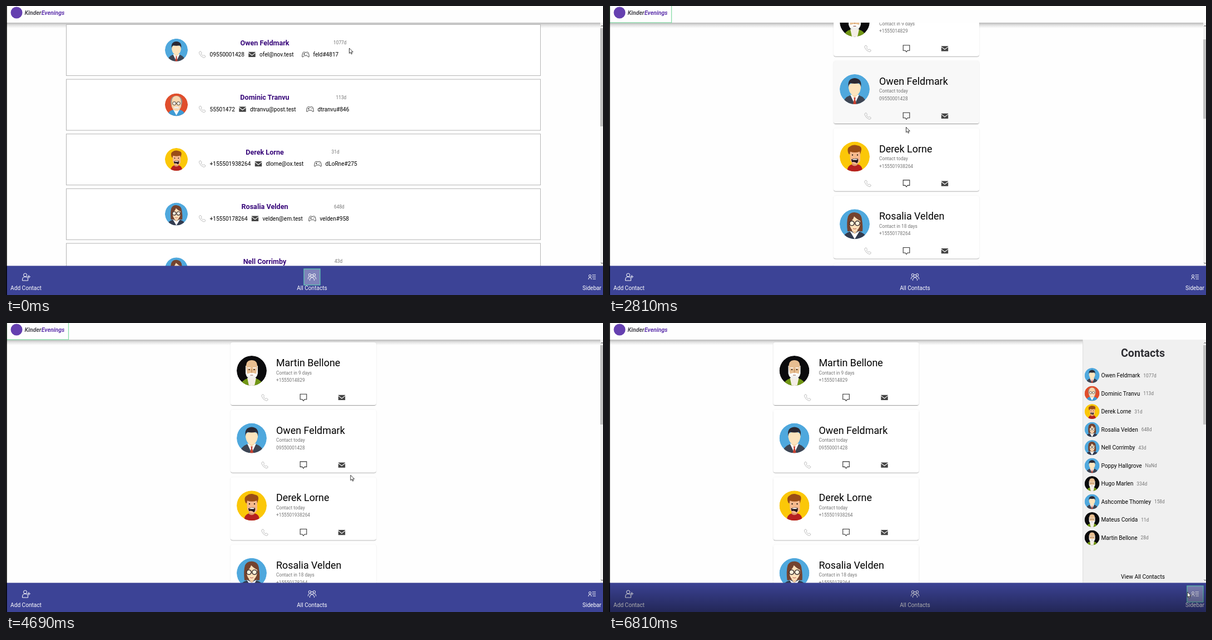
Animation of 1074 by 521 pixels, one loop 6840 ms. Source, as an HTML page:

```html
<!DOCTYPE html>
<html lang="en">
<head>
<meta charset="utf-8">
<title>Contacts</title>
<style>
  html, body { margin: 0; width: 100%; height: 100%; overflow: hidden; background: #fff; }
  svg { display: block; width: 1074px; height: 521px; font-family: Roboto, sans-serif; }
  .name { font-size: 17.9px; }
  .sub { font-size: 8.35px; fill: #757575; }
  .txt { font-size: 10.1px; }
  .bold { font-size: 12.6px; font-weight: 700; fill: #38087a; }
  .mid { text-anchor: middle; }
  .line { fill: none; stroke: #fff; stroke-width: 1; }
  .ring { fill: #fff; fill-opacity: .34; stroke: #62c5b2; stroke-width: 1.3; }
</style>
</head>
<body>
<svg viewBox="0 0 1074 521">
  <defs>
    <clipPath id="round"><circle r="27"/></clipPath>
    <clipPath id="sideClip"><rect id="sideBox" y="30" width="217" height="438"/></clipPath>
    <filter id="soft" x="-5%" y="-10%" width="110%" height="130%">
      <feDropShadow dx="0" dy=".9" stdDeviation=".5" flood-opacity=".36"/>
      <feDropShadow dx="0" dy=".5" stdDeviation="1" flood-opacity=".1"/>
    </filter>
    <linearGradient id="shade" x2="0" y2="1">
      <stop offset="0" stop-opacity=".27"/><stop offset=".5" stop-opacity=".1"/><stop offset="1" stop-opacity="0"/>
    </linearGradient>
    <linearGradient id="dusk" x2="0" y2="1">
      <stop offset="0" stop-opacity="0"/><stop offset="1" stop-opacity=".42"/>
    </linearGradient>

    <g id="man" clip-path="url(#round)">
      <circle r="27" fill="#4fa8dd"/>
      <path d="M-21 27Q-20 15-8 11H8Q20 15 21 27Z" fill="#3e4553"/>
      <path d="M-8 10L0 27 8 10Z" fill="#fff"/>
      <path d="M-2 15h4l-1 3 2 9h-6l2-9z" fill="#c8402f"/>
      <path d="M-5 6H5V11L0 15-5 11Z" fill="#f3d3a0"/>
      <path d="M-11-8Q0-15 11-8V-2Q9 11 0 12-9 11-11-2Z" fill="#fde4bd"/>
      <path d="M-11-3Q-14-19 0-20 14-19 11-3 11-8 8-11 0-9-8-11-11-8-11-3Z" fill="#2b2933"/>
    </g>
    <g id="elder" clip-path="url(#round)">
      <circle r="27" fill="#e04e2c"/>
      <path d="M-21 27Q-20 15-8 12H8Q20 15 21 27Z" fill="#3f9bd5"/>
      <path d="M-8 11L0 25 8 11Z" fill="#fff"/>
      <path d="M-14-5Q-14-21 0-21 14-21 14-5L11 7H-11Z" fill="#9b9189"/>
      <path d="M-11-7Q-10-21 0-21 10-21 11-7V3Q9 15 0 15-9 15-11 3Z" fill="#f9d6ad"/>
      <path d="M-7 8Q-3 3 0 5 3 3 7 8 3 10 0 8-3 10-7 8Z" fill="#eee"/>
      <g fill="#fff6e8" stroke="#37322f" stroke-width="1.3"><circle cx="-5" cy="-3" r="4"/><circle cx="5" cy="-3" r="4"/><path d="M-1-3H1"/></g>
    </g>
    <g id="boy" clip-path="url(#round)">
      <circle r="27" fill="#fbc708"/>
      <path d="M-14 27Q-13 16-5 14H6Q14 16 14 27Z" fill="#b6211f"/>
      <path d="M-5 8H5V15Q0 19-5 15Z" fill="#dc956c"/>
      <path d="M-9-10H10V7Q8 13 2 14-6 13-8 6Z" fill="#f6b98d"/>
      <path d="M-11-5Q-15-15-9-18-3-23 5-20 13-19 12-12L10-4 9-9Q0-6-8-9L-9-4Z" fill="#9a4d17"/>
      <circle cx="-4" cy="-3" r="1.1"/><circle cx="5" cy="-3" r="1.1"/>
      <path d="M-6 5Q0 2 6 4 7 9 4 12 0 8-5 10Z" fill="#27161a"/>
      <path d="M-4 5Q0 3 5 4.500L4 6H-4Z" fill="#fff"/>
    </g>
    <g id="woman" clip-path="url(#round)">
      <circle r="27" fill="#4fa8dd"/>
      <path d="M-13 13Q-15-4-12-14-8-22 1-21 12-20 13-8 15 4 14 13Z" fill="#74432f"/>
      <path d="M-22 27Q-20 16-7 13H7Q20 16 22 27Z" fill="#333c50"/>
      <path d="M-9 12L0 27 9 12 0 17Z" fill="#fff"/>
      <path d="M-5 6H5V12L0 18-5 12Z" fill="#f0caa0"/>
      <path d="M-9-4Q-3-7-1-14 5-8 10-6V0Q8 11 0 13-8 11-9 0Z" fill="#fde0ba"/>
      <g fill="#fff2dc" stroke="#30282a" stroke-width="1.4"><circle cx="-5" cy="-1.500" r="4.2"/><circle cx="5" cy="-1.500" r="4.2"/></g>
      <path d="M-3 8Q0 10 3 8" fill="none" stroke="#b5554c"/>
    </g>
    <g id="beard" clip-path="url(#round)">
      <circle r="27" fill="#0b0b0d"/>
      <path d="M-20 27Q-18 17-8 14H8Q18 17 20 27Z" fill="#719614"/>
      <path d="M-8 13L-5 27H5L8 13Z" fill="#f4eee6"/>
      <path d="M-11-9H11V5Q9 13 4 14H-4Q-9 13-11 5Z" fill="#f1f1ee"/>
      <path d="M-10-8Q-10-19 0-19 10-19 10-8L8 5H-8Z" fill="#e7be91"/>
      <path d="M-8-5H-2M2-5H8" stroke="#fff" stroke-width="1.6"/>
      <circle cx="-4.5" cy="-2" r="1.1"/><circle cx="4.5" cy="-2" r="1.1"/>
      <path d="M0-3V3" stroke="#c99a6c" stroke-width="2"/>
      <path d="M-8 7Q-4 3 0 4.500 4 3 8 7V9H-8Z" fill="#fff"/>
      <path d="M-2.500 8H2.500" stroke="#8b5748" stroke-width="1.2"/>
    </g>

    <path id="phone" d="M-5-5l2-1 2.2 3.2-1.4 1.2q1.3 2.7 3.7 3.9l1.4-1.4 3 2.2-1.1 2q-1.2.9-3 .3-5-2-7.2-7.4-.5-2 .4-3z" fill="none" stroke="#bdbdbd"/>
    <path id="chat" d="M-5.800-5.700h11.600v9.500H2l-2 2.600-2-2.600h-3.800z" fill="none" stroke="#333" stroke-width="1.1"/>
    <path id="mail" d="M-6.200-4.700H6.200V-4L0 .7-6.200-4ZM-6.200-2.700L0 2.200 6.200-2.700V4.600H-6.200Z" fill="#444"/>
    <path id="pad" d="M-3.5-4.5Q0-3 3.5-4.5 6-4 6.3 4 5 6 2.8 2H-2.8Q-5 6-6.3 4-6-4-3.5-4.5ZM-4-1h3M-2.5-2.5v3M1.8-.8h1M3.2-2h1" fill="none" stroke="#444"/>
    <path id="arrow" d="M0 0V9.4L2.2 7.4 3.7 10.8 5.2 10.1 3.8 6.9H6.8Z" fill="#fff" stroke="#222" stroke-width=".9"/>
    <path id="hand" d="M-.8 1q.9-1.5 1.8 0v3.6l4.3.9q1.2.6.9 2.2l-.9 4.3H.2L-3 7.2q.2-1.3 1.4-.7l.8.8z" fill="#fff" stroke="#111" stroke-width=".9"/>
  </defs>

  <rect width="1074" height="521" fill="#fefefe"/>
  <rect y="30" width="1069" height="10" fill="url(#shade)"/>
  <g id="list"></g>
  <g id="home"></g>
  <g id="side" clip-path="url(#sideClip)"></g>

  <rect x="1069" y="30" width="5" height="438" fill="#f1f1f1"/>
  <rect id="thumb" x="1069" width="5" fill="#c1c1c1"/>
  <path d="M1070.5 37l1.8-2 1.8 2M1070.5 462.5l1.8 2 1.8-2" fill="none" stroke="#444"/>

  <rect width="1074" height="30" fill="#fefefe"/>
  <circle cx="19" cy="12" r="10.5" fill="#6540b0"/>
  <text x="33.5" y="15.5" font-size="10.6" font-weight="700" font-style="italic" fill="#4b4a52">Kinder<tspan fill="#6238ae">Evenings</tspan></text>
  <rect id="logoRing" x="1" y="-2" width="111.5" height="32" fill="none" stroke="#86dba8" stroke-width="1.3"/>

  <rect y="468.4" width="1074" height="53" fill="#3c4396"/>
  <rect id="listRing" class="ring" x="536" y="474" width="29" height="29"/>
  <rect id="sideRing" class="ring" x="1040" y="474" width="29" height="29"/>
  <g class="line">
    <path d="M29.5 495v-2q0-4 3-4.5h4q3 .5 3 4.500v2zM38 488h6M41 485v6"/><circle cx="34.5" cy="485" r="3"/>
    <path d="M546.5 495v-2q.5-3.500 4-3.500t4 3.500v2M543.5 492.500v-2q.3-2.500 3-2.500M557.500 492.500v-2q-.3-2.500-3-2.500"/>
    <circle cx="550.5" cy="486.8" r="2.5"/><circle cx="546.5" cy="484.8" r="2.2"/><circle cx="554.5" cy="484.8" r="2.2"/>
    <path d="M1048 493v-1.5q.3-2 2.500-2t2.500 2v1.5M1054.5 485h6.5M1054.5 488.5h6.5M1055.5 492h5.5"/><circle cx="1050.5" cy="486.5" r="2"/>
  </g>
  <g class="txt mid" fill="#fff">
    <text x="36" y="512">Add Contact</text><text x="550.5" y="512">All Contacts</text><text x="1054" y="512">Sidebar</text>
  </g>
  <rect id="dim" y="466" width="1074" height="55" fill="url(#dusk)"/>
  <rect width="1.6" height="521"/>
  <use id="cursor"/>
</svg>
<script>
const $ = id => document.getElementById(id);
const use = (id, x, y, s = 1) => `<use href="#${id}" transform="translate(${x} ${y}) scale(${s})"/>`;
const text = (cls, x, y, s) => `<text class="${cls}" x="${x}" y="${y}">${s}</text>`;

// name, avatar, days since contact, phone
const people = [
  ['Owen Feldmark', 'man', '1077d', '09550001428'],
  ['Dominic Tranvu', 'elder', '113d', '55501472'],
  ['Derek Lorne', 'boy', '31d', '+155501938264'],
  ['Rosalia Velden', 'woman', '648d', '+15550178264'],
  ['Nell Corrimby', 'woman', '43d'],
  ['Poppy Hallgrove', 'man', 'NaNd'],
  ['Hugo Marlen', 'beard', '334d'],
  ['Ashcombe Thornley', 'man', '158d'],
  ['Mateus Corida', 'beard', '11d', '+15550163927'],
  ['Martin Bellone', 'beard', '28d', '+1555014829']
];

// mail x, mail, gamer tag x, tag, days x
const details = [
  [442.5, 'ofel@nov.test', 539, 'feld#4817', 589],
  [425.5, 'dtranvu@post.test', 547, 'dtranvu#846', 593.5],
  [454, 'dlorne@ox.test', 561, 'dLoRne#275', 585.5],
  [448, 'velden@em.test', 551, 'velden#958', 590],
  [448, '', 551, '', 591]
];

$('list').innerHTML = details.map(([mx, mail, tx, tag, dx], i) => {
  const [name, face, days, phone = ''] = people[i];
  return `<g transform="translate(0 ${i * 98.6})">
    <rect x="108.5" y="33.5" width="853" height="92" fill="#fff" stroke="#b5b5b5"/>
    ${use(face, 306.5, 79.3, .76)}${text('bold mid', 465.5, 70.7, name)}${text('sub', dx, 69, days)}
    ${use('phone', 353, 87.5)}${text('txt', 366.5, 91, phone)}
    ${use('mail', mx, 87.5)}${text('txt', mx + 13.5, 91, mail)}
    ${use('pad', tx, 87.5)}${text('txt', tx + 13.5, 91, tag)}</g>`;
}).join('');

const PITCH = 121.6;
const queue = [[9, 'in 9 days'], [0, 'today'], [2, 'today'], [3, 'in 18 days'], [8, 'in 19 days'], [1, 'in 20 days']];
$('home').innerHTML = queue.map(([p, when], i) => {
  const [name, face, , phone] = people[p];
  return `<g transform="translate(0 ${i * PITCH})">
    <rect class="card" x="404" y="35" width="262" height="113" rx="4" filter="url(#soft)"/>
    ${use(face, 442, 86)}${text('name', 486, 78, name)}
    ${text('sub', 486, 92.5, 'Contact ' + when)}${text('sub', 486, 106, phone)}
    ${use('phone', 465.5, 134.5)}${use('chat', 535, 134)}${use('mail', 604, 134.5)}</g>`;
}).join('');
const cards = [...document.querySelectorAll('.card')];

$('side').innerHTML = `<rect width="217" y="30" height="438" fill="#f0f0f0"/><path d="M.5 30V468" stroke="#ddd"/>
  <g id="centre" class="mid"><text y="61" font-size="19.6" font-weight="700" fill="#2e2e33">Contacts</text>
  <text id="oneLine" class="txt" y="460.5">View All Contacts</text>
  <g id="twoLines">${text('txt', 0, 449, 'View All')}${text('txt', 0, 460.5, 'Contacts')}</g></g>` +
  people.map(([name, face, days], i) => `<g transform="translate(0 ${94.5 + i * 32.5})">
    <g class="face">${use(face, 13.5, 0, .5)}</g>
    <text class="label txt" y="3.5">${name}<tspan class="sub" dx="6" dy="-.5">${days}</tspan></text></g>`).join('');
const faces = document.querySelectorAll('.face'), labels = document.querySelectorAll('.label');

const clamp = v => Math.min(1, Math.max(0, v));
const smooth = v => v * v * (3 - 2 * v);

// value at time t from rows of [time, ...values]
function track(t, rows, ease = v => v) {
  const i = rows.findIndex(r => r[0] > t);
  if (i < 0) return rows[rows.length - 1].slice(1);
  if (!i) return rows[0].slice(1);
  const a = rows[i - 1], b = rows[i], k = ease((t - a[0]) / (b[0] - a[0]));
  return a.slice(1).map((v, j) => v + (b[j + 1] - v) * k);
}

const path = [[220, 617.5, 76], [870, 60, 11], [1230, 60, 11], [1830, 617.5, 49.5], [1960, 617.5, 49.5],
  [2250, 690, 150], [2620, 534.5, 218.5], [2830, 534.5, 218.5], [3250, 563.5, 245], [4540, 564, 246.5],
  [5250, 1044, 485], [6390, 1044, 485], [6600, 1040.5, 485]];
const wheel = [[2700, 0], [2810, 57.2], [2900, 95], [3130, 190], [3260, 200], [3320, 227], [3390, 285],
  [3420, 285], [3700, 76], [3860, 0]];

const show = (id, on) => $(id).setAttribute('visibility', on ? 'visible' : 'hidden');
const move = (el, x, y) => el.setAttribute('transform', `translate(${x} ${y})`);

function draw(t) {
  const atHome = t >= 1220, clicked = t >= 5670;
  const [cx, cy] = track(t, path, smooth);
  const [scroll] = track(t, wheel);
  const open = clamp((t - 5740) / 500), w = 217 * smooth(open) * Math.min(1, .79 + .42 * open);

  show('list', !atHome);
  show('home', atHome);
  show('listRing', !atHome);
  show('logoRing', atHome && !clicked);
  show('sideRing', clicked);

  // hover lags behind while the wheel turns
  const seen = t < 2950 ? 0 : t < 3380 || t >= 4130 ? scroll : 285;
  const y = cy + seen - 35;
  cards.forEach((c, i) => {
    const over = cx > 404 && cx < 666 && cy > 30 && cy < 468 && y > i * PITCH && y < i * PITCH + 113;
    c.setAttribute('fill', over ? '#f8f8f8' : '#fff');
  });
  move($('home'), -w / 2, -scroll);

  show('side', w > 0);
  move($('side'), 1069 - w, 0);
  $('side').setAttribute('opacity', open);
  $('sideBox').setAttribute('width', w);
  move($('centre'), w / 2, 0);
  show('oneLine', w >= 85);
  show('twoLines', w > 0 && w < 85);
  const grow = clamp((w - 40) / 110);
  faces.forEach(f => f.setAttribute('transform', `translate(3.5 0) scale(${grow} 1)`));
  labels.forEach(l => l.setAttribute('x', 5 + 28.5 * grow));

  $('thumb').setAttribute('y', 40 + scroll * .352);
  $('thumb').setAttribute('height', atHome ? 143 : 177);
  $('dim').setAttribute('opacity', clamp((t - 6390) / 400));

  const link = t < 6390 && (cy > 468 || (cx < 112 && cy < 30));
  $('cursor').setAttribute('href', link ? '#hand' : '#arrow');
  move($('cursor'), cx, cy);
}

const start = performance.now();
function tick() {
  draw((performance.now() - start) % 6840);
  requestAnimationFrame(tick);
}
tick();
</script>
</body>
</html>
```
